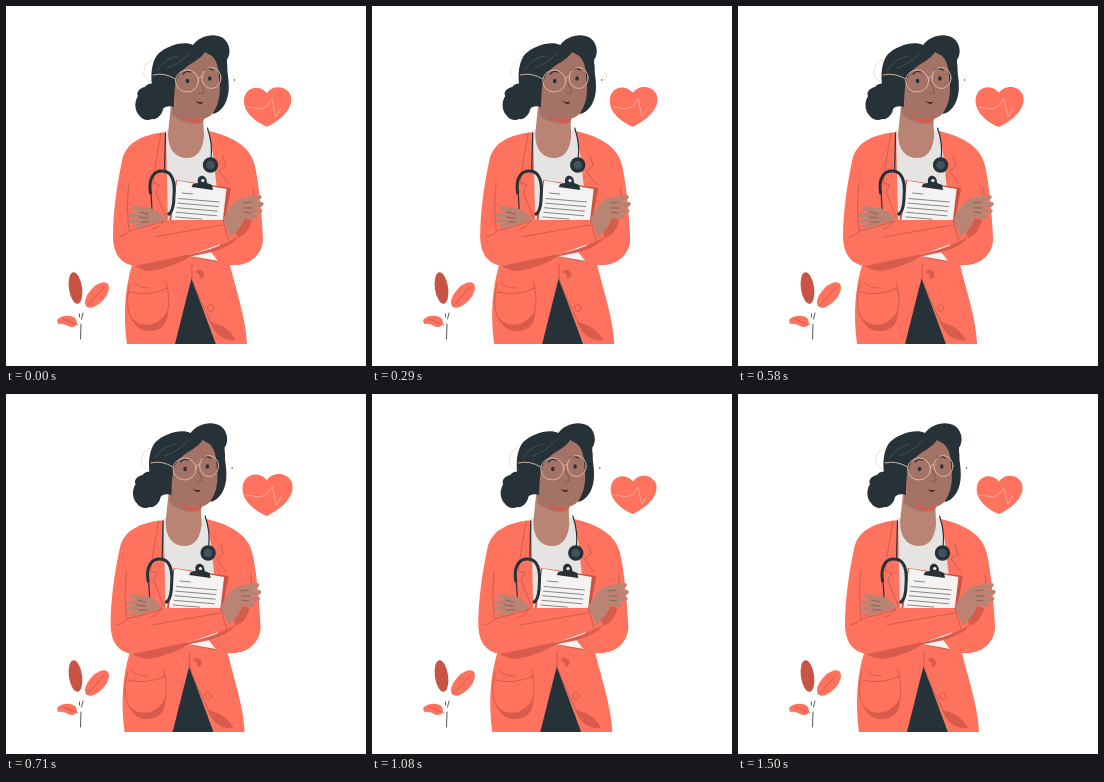
Animation of 360 by 360 pixels, one loop 1540 ms. Source, as an HTML page:

```html
<!DOCTYPE html>
<html lang="en">
<head>
<meta charset="utf-8">
<title>Doctor with clipboard</title>
<style>
html, body { margin: 0; width: 100%; height: 100%; overflow: hidden; background: #fff; }
svg { display: block; width: 100vw; height: 100vh; }
.ink { fill: none; stroke: #263238; stroke-linecap: round; stroke-linejoin: round; }
.fold { fill: none; stroke: #c2594a; stroke-width: .8; stroke-linecap: round; stroke-linejoin: round; }
.skinline { fill: none; stroke: #79503f; stroke-width: .7; stroke-linecap: round; }
.pale { fill: none; stroke: #dcc0b0; stroke-width: .9; stroke-linecap: round; }
.coral { fill: #ff725e; }
.shade { fill: #d85c4b; }
.dark { fill: #263238; }
.face { fill: #a57365; }
.skin { fill: #b98474; }
</style>
</head>
<body>
<svg viewBox="0 0 360 360">
  <g id="plant">
    <path class="ink" stroke-width=".8" d="M77 307L75.500 313M73.500 308L73.500 311M75 318L74.500 333M70 317L71.500 319"/>
    <ellipse cx="69.500" cy="282" rx="6.600" ry="16" transform="rotate(-8 69.500 282)" fill="#c95443"/>
    <path class="fold" d="M67.500 270L72 297"/>
    <ellipse class="coral" cx="91" cy="289" rx="8" ry="15.500" transform="rotate(42 91 289)"/>
    <path class="fold" d="M81 300Q90 291 98 281"/>
    <path class="coral" d="M51 314C55 309 66 308 70 313C72 318 70 321 66 321C61 321 60 317 52 318Z"/>
    <path class="fold" d="M57 313L69 318"/>
  </g>

  <g id="heart">
    <path class="coral" d="M261 120.700C250 116 238 107 238 95C238 82 252 77 261 87C266 79 280 79 284.500 89C288.500 102 275 114 261 120.700Z"/>
    <path fill="none" stroke="#ffab9e" stroke-width=".9" stroke-linejoin="round" d="M241 101L255 103L261 100L266 93L270 111L275 102"/>
  </g>

  <g id="person">
    <path class="pale" id="haloL" d="M147 54Q139 56 138 65Q136 72 146 76"/>
    <path class="pale" id="haloR" stroke="#999" d="M229 74Q235 74 233 67"/>
    <circle class="dark" cx="228.500" cy="74" r=".7"/>

    <!-- hair behind the face -->
    <path class="dark" d="M152 79C146 76 141 78 139 81C133 82 130 87 132 90C127 98 130 106 133 109C136 114 142 115 146 113C151 114 156 109 157 103Q160 99 168 101L168 80Z"/>
    <path class="dark" d="M198 52L221 54C220 64 224 74 222.500 86C221 98 215 106 207 108Z"/>

    <!-- shirt and neck -->
    <path d="M159 124L203 124L207 148L212 186L162 216Z" fill="#e5e4e2"/>
    <path class="skin" d="M165 99L197 104L198 130C197 145 190 152 181 152C170 152 162 144 162 128Z"/>
    <path class="face" d="M166 98L197 104L197 116C185 121 171 114 166 108Z"/>
    <path class="face" d="M167 65C172 54 188 44 199 44C209 47 213 60 213 72C215 84 214 97 207 107C199 117 182 114 171 104L166 92Z"/>
    <path class="shade" d="M175 109Q186 115 199 112Q197 117 190 117Q180 116 175 109Z"/>

    <!-- hair in front -->
    <path class="dark" d="M147 84C144 72 145 56 152 48C160 40 178 34 187 39C193 30 208 26 217 32C224 37 226 48 220 55C222 58 222 66 219 72C216 66 213 58 206 50L199 46C194 54 184 57 177 64C169 70 168 84 168 101C159 99 150 93 147 84Z"/>
    <path d="M151 65Q157 53 172 50M161 62Q174 58 185 46" fill="none" stroke="#56646a" stroke-width=".6"/>

    <!-- face -->
    <path class="ink" stroke-width="1.300" d="M177 68Q180 64 185 66M199 64Q203 61 207 64"/>
    <ellipse class="dark" cx="181.500" cy="75" rx="1.800" ry="2.300"/>
    <ellipse class="dark" cx="203.800" cy="72.500" rx="1.700" ry="2.300"/>
    <path class="skinline" d="M194 76Q198 83 198 87Q195 89 193 87"/>
    <path d="M189 94.500Q193 97.500 197 95.500Q195 101 189 94.500Z" fill="#4a241f"/>
    <g class="pale">
      <ellipse cx="181" cy="75" rx="11.500" ry="11"/>
      <ellipse cx="205.500" cy="72" rx="9.500" ry="10.500"/>
      <path d="M192.500 73Q194 69 196 71M169.500 73Q158 66 147 69"/>
    </g>

    <!-- coat -->
    <path class="coral" d="M160 126C141 128 120 134 116 155C111 178 107 207 107 230C107 244 114 253 126 259C119 282 117 309 121 338L171 338L185.500 272L210 338L241 338C240 312 230 284 224 259C244 260 257 248 257 233C256 209 253 178 249 160C245 142 229 131 203 125L207 148L211 184L200 215L162 216Z"/>
    <path class="dark" d="M185.500 272L169 338L210 338Z"/>
    <path class="shade" d="M204 316C212 318 222 320 230 334Q212 336 204 316Z"/>
    <path class="shade" d="M127 259L190 247Q168 262 144 265Q134 264 127 259Z"/>
    <path class="fold" d="M155 127C152 144 149 160 147 177L154 179L150 186L160 212M217 150L220 160L213 165L223 178M123 177Q120 202 123 224M247 181Q249 190 247 195M186 258L186 272M185.500 272Q195 298 206 318"/>
    <path class="fold" d="M124 278C118 298 122 322 143 323C163 321 166 297 160 276M124 286Q143 291 162 282M128 276Q132 282 143 282"/>
    <path class="shade" d="M124 308C130 323 152 323 162 304C162 320 154 325 143 325C133 325 127 318 124 308Z"/>
    <path class="shade" d="M189 266Q194 261 198 267Q199 273 193 273Q196 269 189 266Z"/>
    <path class="fold" d="M201 301Q204 309 208 303Q206 295 202 300"/>

    <!-- clipboard -->
    <path d="M170 174L225 182L211 256L182 250L163 216Z" fill="#c95443"/>
    <path d="M171 174.500L220.500 183L212 255L184 250L165 216Z" fill="#f5f3f2"/>
    <path class="dark" d="M185.500 181L187 178L192 177C190 168 201 167 201 177L206 179L207 184Z"/>
    <circle cx="196.800" cy="174.500" r="1.600" fill="#fff"/>
    <path id="notes" fill="none" stroke="#6b6b6b" stroke-width=".8"/>

    <!-- stethoscope -->
    <path class="ink" stroke-width="1.200" d="M159.500 127L158.500 165M201.500 122Q207 138 205 153M145 187L146 203"/>
    <path class="ink" stroke-width="3" d="M144.500 187C142 171 149 164.500 156.500 165C167 165 169 177 168 190Q168 203 164 207"/>
    <circle class="dark" cx="163" cy="208" r="1.800"/>
    <circle class="dark" cx="204.500" cy="159" r="7.700"/>
    <circle cx="204.500" cy="159" r="4.300" fill="#42535d"/>

    <!-- crossed arms -->
    <path class="shade" d="M222 207L246 214Q243 228 232 232Z"/>
    <path class="skin" d="M160 215C152 203 145 202 137 201L127 200Q124 202 128 204L134 206L123 207Q120 209 124 211L133 211L123 214Q121 217 126 217L135 216L126 220Q126 223 131 222L158 222Z"/>
    <path class="skinline" d="M134 206L142 208M133 211L142 212M135 216L143 216"/>
    <path class="coral" d="M108 225L122 224L159 214L217 214L223 235L190 247L129 260C114 258 105 246 108 225Z"/>
    <path class="coral" d="M217 214L224 235L238 230L252 224C259 239 253 254 237 258Q223 261 212 255L205 246L222 237Z"/>
    <path class="shade" d="M182 249Q208 243 222 236L232 231Q226 240 206 246L184 250.500Z"/>
    <path class="fold" d="M123 225Q140 221 159 215M157 215Q155 221 147 223M217 214L223 235M149 231Q180 225 217 219M113 231Q120 229 124 225"/>
    <path class="skin" d="M217 213L225 200Q231 192 240 191L254 189Q258 191 253 194L245 196L256 196Q260 198 255 201L246 202L255 203Q259 205 253 208L245 207L251 210Q253 213 247 213L239 212Q235 223 225 231Z"/>
    <path class="skinline" d="M245 196L237 197M246 202L238 202M245 207L238 206"/>
  </g>
</svg>
<script>
const LOOP = 1540;
const el = id => document.getElementById(id);

// time, sway of the figure, heart size
const keys = [
  [0, 0, 1], [90, -2, 1.05], [290, 1.2, 1.01], [460, -.7, .97], [710, -2.4, 1.06],
  [920, 1.2, .96], [1080, -.7, .97], [1330, -1.8, .98], [1500, 0, .97]
];

function keyAt(i) {
  const n = keys.length, turn = Math.floor(i / n), k = keys[i - turn * n];
  return [k[0] + turn * LOOP, k[1], k[2]];
}

function slope(i, c) {
  const a = keyAt(i - 1), b = keyAt(i + 1);
  return (b[c] - a[c]) / (b[0] - a[0]);
}

// smooth curve through the keys
function sample(t, c) {
  let i = keys.length - 1;
  while (keys[i][0] > t) i--;
  const a = keyAt(i), b = keyAt(i + 1), h = b[0] - a[0], u = (t - a[0]) / h;
  const s = u * u * (3 - 2 * u);
  return a[c] + (b[c] - a[c]) * s
    + h * u * (1 - u) * ((1 - u) * slope(i, c) - u * slope(i + 1, c));
}

let lines = "M176 187l11 1";
for (let i = 0; i < 5; i++) {
  const x = 172.500 - i * .8, y = 192.500 + i * 4.600;
  lines += `M${x} ${y}l${i === 4 ? 27 : 41} ${i === 4 ? 2.300 : 3.500}`;
}
el("notes").setAttribute("d", lines);

function draw(t) {
  const dx = sample(t, 1), size = sample(t, 2);
  const right = Math.max(0, Math.min(1, dx));
  el("person").setAttribute("transform", `translate(${dx} 0)`);
  el("heart").setAttribute("transform", `translate(262 101) scale(${size}) translate(-262 -101)`);
  el("haloL").setAttribute("opacity", .55 - right * .2);
  el("haloR").setAttribute("opacity", right * .6);
}

function tick() {
  draw(performance.now() % LOOP);
  requestAnimationFrame(tick);
}
tick();
</script>
</body>
</html>
```
